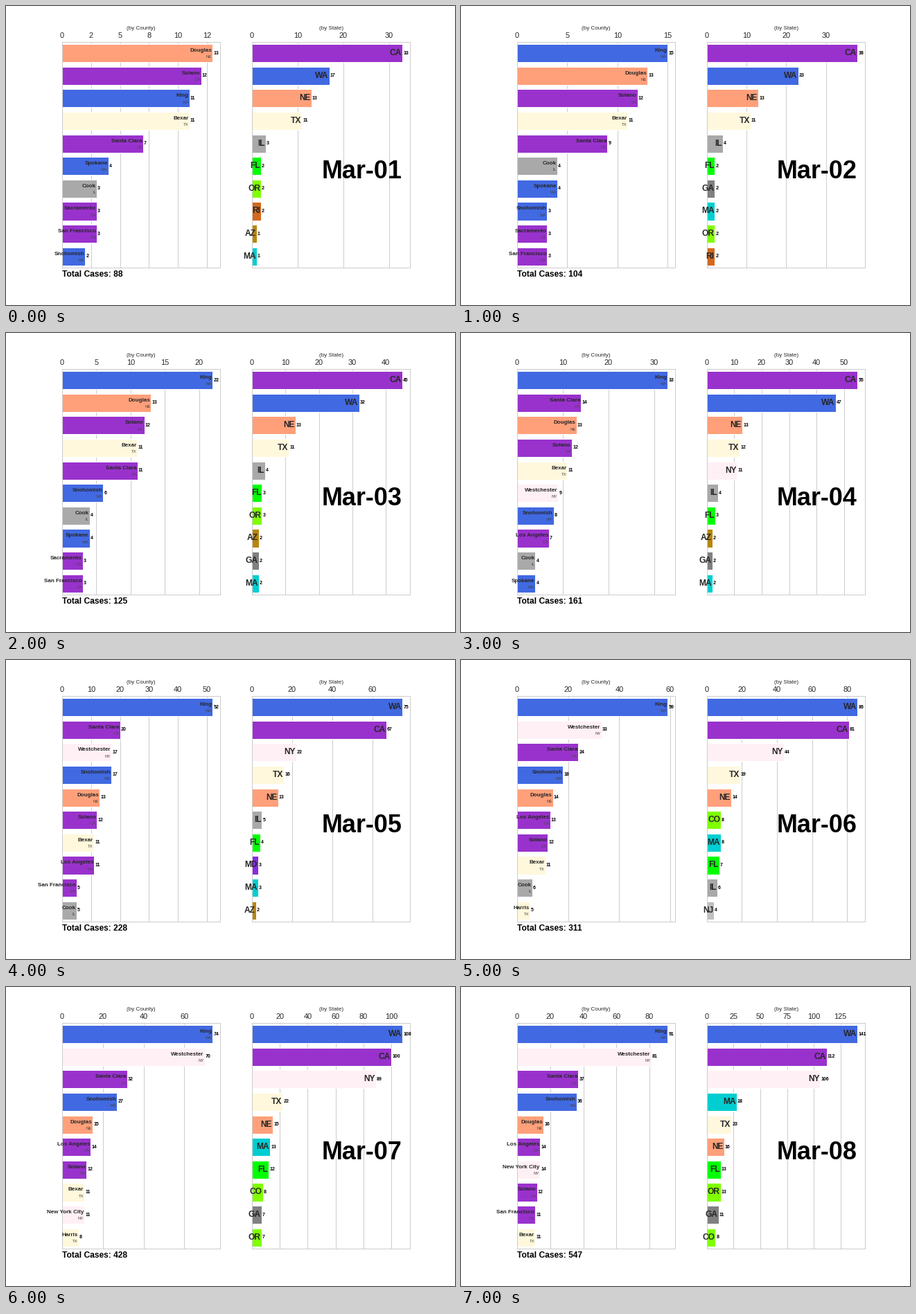
Write a matplotlib script that moves like this. It is 648 by 432 pixels and loops after 8000 ms.

```python
import matplotlib.pyplot as plt
from matplotlib.animation import FuncAnimation

INK = "0.15"
plt.rcParams.update({
    "font.family": "Liberation Sans",
    "text.color": INK,
    "axes.labelcolor": INK,
    "xtick.color": INK,
    "axes.edgecolor": "0.8",
    "axes.linewidth": 1,
    "axes.axisbelow": True,
    "grid.color": "0.8",
    "grid.linewidth": 1,
})

COLORS = {
    "CA": "darkorchid", "WA": "royalblue", "NE": "lightsalmon",
    "TX": "cornsilk", "IL": "darkgray", "FL": "lime",
    "OR": "chartreuse", "RI": "chocolate", "AZ": "darkgoldenrod",
    "MA": "darkturquoise", "GA": "gray", "NY": "lavenderblush",
    "MD": "blueviolet", "CO": "chartreuse", "NJ": "silver",
}

MEMBERS = {
    "CA": "Solano,Santa Clara,Sacramento,San Francisco,Los Angeles",
    "WA": "King,Spokane,Snohomish",
    "NE": "Douglas",
    "TX": "Bexar,Harris",
    "IL": "Cook",
    "NY": "Westchester,New York City",
}
STATE_OF = {c: s for s, names in MEMBERS.items() for c in names.split(",")}

# One line per day, largest first.
COUNTIES = """
Douglas 13,Solano 12,King 11,Bexar 11,Santa Clara 7,Spokane 4,Cook 3,Sacramento 3,San Francisco 3,Snohomish 2
King 15,Douglas 13,Solano 12,Bexar 11,Santa Clara 9,Cook 4,Spokane 4,Snohomish 3,Sacramento 3,San Francisco 3
King 22,Douglas 13,Solano 12,Bexar 11,Santa Clara 11,Snohomish 6,Cook 4,Spokane 4,Sacramento 3,San Francisco 3
King 33,Santa Clara 14,Douglas 13,Solano 12,Bexar 11,Westchester 9,Snohomish 8,Los Angeles 7,Cook 4,Spokane 4
King 52,Santa Clara 20,Westchester 17,Snohomish 17,Douglas 13,Solano 12,Bexar 11,Los Angeles 11,San Francisco 5,Cook 5
King 59,Westchester 33,Santa Clara 24,Snohomish 18,Douglas 14,Los Angeles 13,Solano 12,Bexar 11,Cook 6,Harris 5
King 74,Westchester 70,Santa Clara 32,Snohomish 27,Douglas 15,Los Angeles 14,Solano 12,Bexar 11,New York City 11,Harris 8
King 91,Westchester 81,Santa Clara 37,Snohomish 36,Douglas 16,Los Angeles 14,New York City 14,Solano 12,San Francisco 11,Bexar 11
"""

STATES = """
CA 33,WA 17,NE 13,TX 11,IL 3,FL 2,OR 2,RI 2,AZ 1,MA 1
CA 38,WA 23,NE 13,TX 11,IL 4,FL 2,GA 2,MA 2,OR 2,RI 2
CA 45,WA 32,NE 13,TX 11,IL 4,FL 3,OR 3,AZ 2,GA 2,MA 2
CA 55,WA 47,NE 13,TX 12,NY 11,IL 4,FL 3,AZ 2,GA 2,MA 2
WA 75,CA 67,NY 22,TX 16,NE 13,IL 5,FL 4,MD 3,MA 3,AZ 2
WA 86,CA 81,NY 44,TX 19,NE 14,CO 8,MA 8,FL 7,IL 6,NJ 4
WA 108,CA 100,NY 89,TX 22,NE 15,MA 13,FL 12,CO 8,GA 7,OR 7
WA 141,CA 112,NY 106,MA 28,TX 23,NE 16,FL 13,OR 13,GA 11,CO 8
"""

TOTALS = [88, 104, 125, 161, 228, 311, 428, 547]


def parse(table):
    days = []
    for line in table.strip().splitlines():
        pairs = [item.rsplit(" ", 1) for item in line.split(",")]
        days.append([(name, int(count)) for name, count in pairs])
    return days


counties, states = parse(COUNTIES), parse(STATES)

fig, (left, right) = plt.subplots(1, 2, figsize=(9, 6), dpi=72)
fig.subplots_adjust(left=0.125, right=0.9, bottom=0.125, top=0.88, wspace=0.2)


def draw_bars(ax, rows, label):
    """Draw a ranked bar chart and return the gap between text and bar end."""
    ax.clear()
    names, counts = zip(*rows)
    top = max(counts)
    gap = top / 200
    fills = [COLORS[STATE_OF.get(n, n)] for n in names]
    ax.barh(range(len(rows)), counts, height=0.8, color=fills,
            edgecolor="white", linewidth=1)
    ax.set_xlim(0, top * 1.05)
    ax.set_ylim(len(rows) - 0.5, -0.5)
    ax.set_yticks([])
    ax.grid(True, axis="x")
    ax.xaxis.tick_top()
    ax.xaxis.set_label_position("top")
    ax.xaxis.set_major_formatter("{x:.0f}")
    ax.tick_params(axis="x", length=0, pad=3.5, labelsize=11)
    ax.set_xlabel(label, fontsize=8, labelpad=4)
    for i, count in enumerate(counts):
        ax.text(count + gap, i, str(count), size=7, weight="bold",
                color="black", ha="left", va="center")
    return gap


def draw(day):
    gap = draw_bars(left, counties[day], "(by County)")
    for i, (name, count) in enumerate(counties[day]):
        left.text(count - gap, i, name, size=8, weight="bold",
                  ha="right", va="bottom")
        left.text(count - gap, i + 0.25, STATE_OF[name], size=6,
                  color="#444444", ha="right", va="bottom")
    left.text(0, -0.04, f"Total Cases: {TOTALS[day]}", size=12, weight="bold",
              color="black", transform=left.transAxes)

    gap = draw_bars(right, states[day], "(by State)")
    for i, (name, count) in enumerate(states[day]):
        right.text(count - gap, i, name, size=12, weight="bold",
                   ha="right", va="center")
    right.text(0.95, 0.397, f"Mar-{day + 1:02d}", size=36, weight="bold",
               color="black", ha="right", transform=right.transAxes)
    return []


anim = FuncAnimation(fig, draw, frames=len(TOTALS), init_func=lambda: draw(0),
                     interval=1000, repeat=True, repeat_delay=0)
plt.show()
```
